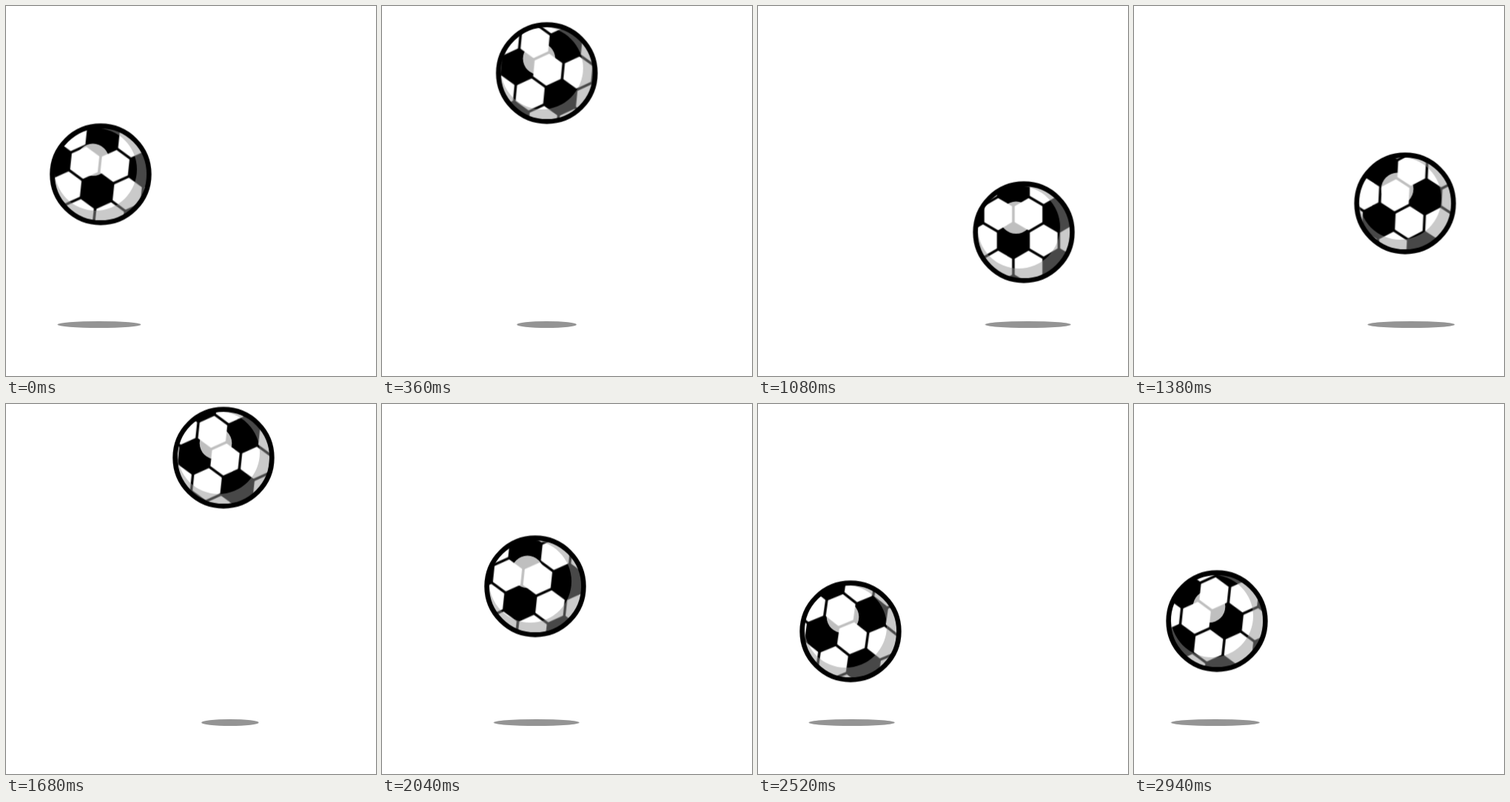
An HTML page without scripts that plays this animation: 500 px wide and 500 px high, repeating every 3 s.

```html
<!DOCTYPE html>
<html lang="en">
<head>
<meta charset="utf-8">
<title>Bouncing ball</title>
<style>
  html, body { margin: 0; width: 100%; height: 100%; overflow: hidden; background: #fff; }
  svg { display: block; width: 100vw; height: 100vh; }

  /* The cycle begins at the kick on the left, 107 ms before the loop point */
  .across, .bounce, .slide, .squeeze { animation: 3s linear -107ms infinite; }
  .across  { animation-name: across; }
  .bounce  { animation-name: bounce; }
  .slide   { animation-name: slide; }
  .squeeze { animation-name: squeeze; animation-timing-function: cubic-bezier(.3, .1, .7, .9); }
  .skin    { animation: roll 3s linear infinite; }

  @keyframes across {
    0%, 100% { transform: translateX(99.4px); }
    26.6%    { transform: translateX(309.7px); }
    42.07%   { transform: translateX(368.6px); }
    47.3%    { transform: translateX(383px); }
    74.5%    { transform: translateX(186px); }
    89.97%   { transform: translateX(114px); }
  }
  /* Parabolas: decelerate up from the ground, accelerate down from each peak */
  @keyframes bounce {
    0%, 26.6%, 42.07%, 47.3%, 74.5%, 89.97%, 100% {
      transform: translateY(355px);
      animation-timing-function: cubic-bezier(.3333, .6667, .6667, 1);
    }
    13.3% {
      transform: translateY(82.5px);
      animation-timing-function: cubic-bezier(.3333, 0, .6667, .3333);
    }
    34.33%, 82.23% {
      transform: translateY(263px);
      animation-timing-function: cubic-bezier(.3333, 0, .6667, .3333);
    }
    44.7% {
      transform: translateY(345px);
      animation-timing-function: cubic-bezier(.3333, 0, .6667, .3333);
    }
    60.9% {
      transform: translateY(70px);
      animation-timing-function: cubic-bezier(.3333, 0, .6667, .3333);
    }
    94.97% {
      transform: translateY(317px);
      animation-timing-function: cubic-bezier(.3333, 0, .6667, .3333);
    }
  }
  @keyframes slide {
    0%, 100% { transform: translateX(97px); }
    26.6%    { transform: translateX(311px); }
    42.07%   { transform: translateX(375px); }
    47.3%    { transform: translateX(391px); }
    59.57%   { transform: translateX(303px); }
    74.5%    { transform: translateX(186px); }
    89.97%   { transform: translateX(116px); }
  }
  @keyframes squeeze {
    0%, 26.6%, 42.07%, 47.3%, 74.5%, 89.97%, 100% { transform: scaleX(1); }
    13.3%, 60.9%   { transform: scaleX(.61); }
    34.33%, 82.23% { transform: scaleX(.78); }
    44.7%          { transform: scaleX(.98); }
    94.97%         { transform: scaleX(.94); }
  }
  @keyframes roll {
    0%, 100% { transform: translate(-4.5px, 21.5px) rotate(6deg); }
    22%   { transform: translate(-211.5px, 279px) rotate(5deg); }
    23%   { transform: translate(-221px, 291px) rotate(5deg); }
    36%   { transform: translate(-260px, 366px) rotate(0deg); }
    43.7% { transform: translate(-310px, 399px) rotate(2deg); }
    56%   { transform: translate(-248.5px, 226.4px) rotate(6deg); }
    68%   { transform: translate(-150.8px, 80.8px) rotate(6deg); }
    70.9% { transform: translate(-126px, 46px) rotate(6deg); }
    84%   { transform: translate(-38.8px, 3.6px) rotate(8deg); }
    96.4% { transform: translate(27px, -18px) rotate(6deg); }
    98%   { transform: translate(13px, -.5px) rotate(6deg); }
  }
</style>
</head>
<body>
<svg viewBox="0 0 500 500">
  <defs>
    <clipPath id="round"><circle r="64"/></clipPath>
    <path id="hex" d="M0-23.67L20.5-11.83V11.83L0 23.67L-20.5 11.83V-11.83Z"/>
    <!-- One repeat of the leather: two dark patches and the seams between light ones -->
    <g id="tile" stroke="#000" stroke-width="3.5">
      <use href="#hex"/>
      <use href="#hex" x="61.5" y="35.5"/>
      <path fill="none" d="M61.5-11.83V11.83M0 23.67V47.33M20.5 11.83L41 23.67M102.5 11.83L82 23.67M20.5 59.17L41 47.33M102.5 59.17L82 47.33"/>
    </g>
    <g id="row">
      <use href="#tile" x="-246"/>
      <use href="#tile" x="-123"/>
      <use href="#tile"/>
      <use href="#tile" x="123"/>
      <use href="#tile" x="246"/>
      <use href="#tile" x="369"/>
    </g>
    <g id="rows">
      <use href="#row"/>
      <use href="#row" y="71"/>
      <use href="#row" y="142"/>
      <use href="#row" y="213"/>
    </g>
  </defs>

  <rect width="500" height="500" fill="#fff"/>

  <g class="slide">
    <ellipse class="squeeze" cy="430.5" rx="61.5" ry="4.6" fill="#949494"/>
  </g>

  <g class="across">
    <g class="bounce">
      <g clip-path="url(#round)">
        <circle r="64" fill="#fff"/>
        <g class="skin">
          <use href="#rows" y="-568"/>
          <use href="#rows" y="-284"/>
          <use href="#rows"/>
        </g>
        <path fill="#949494" fill-opacity=".49" fill-rule="evenodd"
          d="M-63 0a63 63 0 1 1 126 0a63 63 0 1 1-126 0ZM-62.4-6.7a55.7 55.7 0 1 1 111.4 0a55.7 55.7 0 1 1-111.4 0Z"/>
        <circle cx="-10.5" cy="-19.7" r="21.8" fill="#fff" fill-opacity=".75"/>
      </g>
      <circle r="65.4" fill="none" stroke="#000" stroke-width="6.6"/>
    </g>
  </g>
</svg>
</body>
</html>
```
